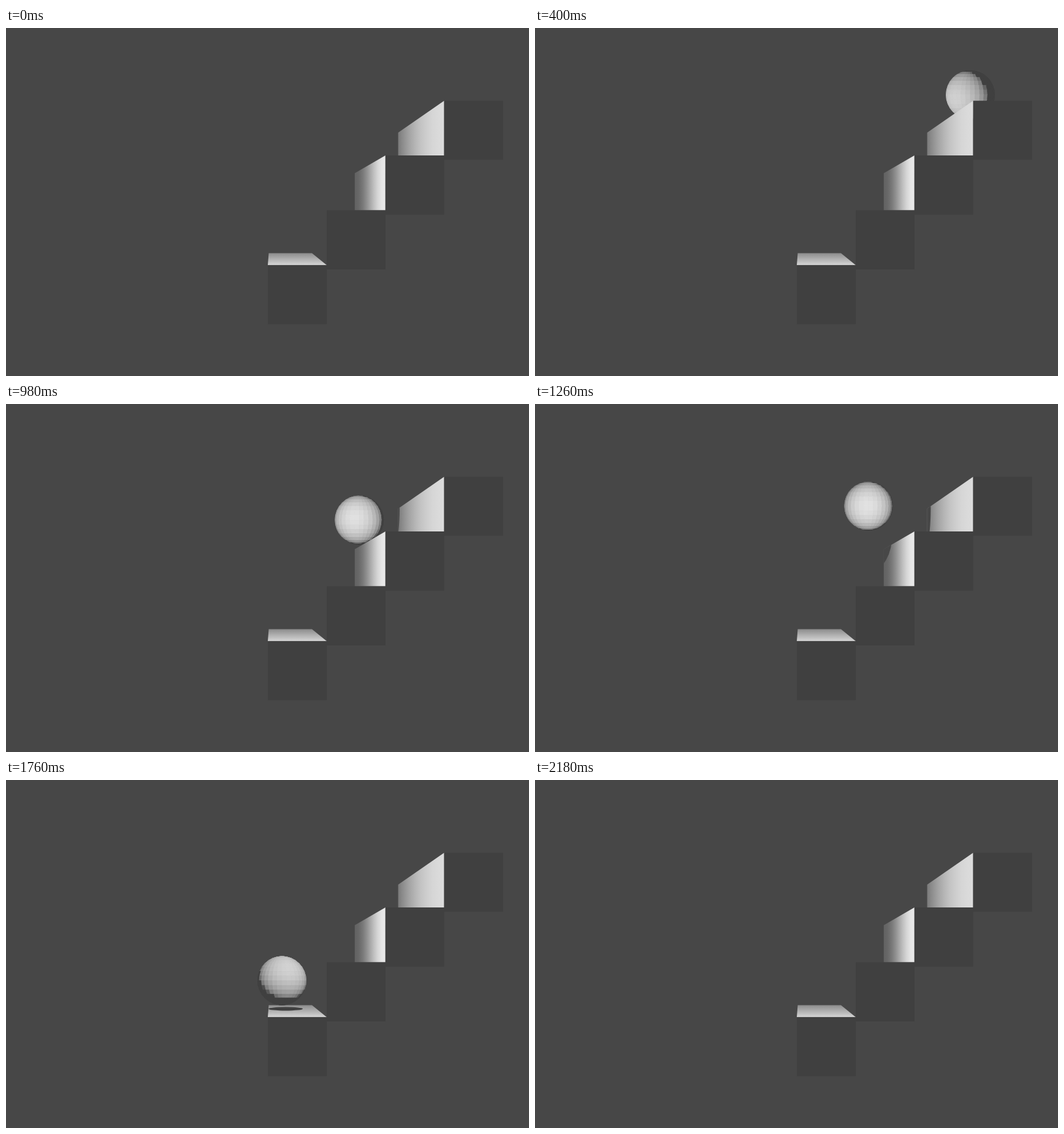
An HTML page with a canvas for the animation above (2200 ms loop, 853 by 568 pixels).

```html
<!DOCTYPE html>
<html>
<head>
<meta charset="utf-8">
<style>
  html, body { margin: 0; width: 100%; height: 100%; overflow: hidden; background: #474747; }
  canvas { display: block; }
</style>
</head>
<body>
<canvas id="stage" width="853" height="568"></canvas>
<script>
const ctx = document.getElementById('stage').getContext('2d');
const LOOP = 2200, STEP = 20, R = 40, RINGS = 16;
const BACK = '#474747', DARK = '#404040';
const LIGHT = [530, 170, 240];

// Falls, bounces and peaks of the ball: [time, x, y].
const path = [
  [0, 711, -47], [400, 710, 109], [600, 645, 96], [1000, 576, 190], [1180, 559, 156],
  [1580, 517, 256.5], [1640, 466, 260], [1800, 449, 340], [2200, 340, 612]
];

const gray = v => `rgb(${v},${v},${v})`;
const mix = (a, b, k) => a + (b - a) * k;
const clamp = k => Math.max(0, Math.min(1, k));
const linear = k => k;
const smooth = k => k * k * (3 - 2 * k);
const easeOut = k => 1 - (1 - k) ** 2;

const stair = i => [714.6 - 95.8 * i, 118.7 + 89.4 * i];

// Lit side of stair i, standing on the next stair.
function wall(i, width, drop, tones, ease) {
  const [x, top] = stair(i), bottom = stair(i + 1)[1], left = x - width;
  return {
    points: [[left, top + drop], [x, top], [x, bottom], [left, bottom]],
    from: [left, 0], to: [x, 0], tones, ease
  };
}

const upperWall = wall(0, 75, 52, [122, 220], easeOut);
const lowerWall = wall(1, 50, 29, [98, 235], smooth);
const topFace = {
  points: [[428.5, 367.5], [499, 367.5], [523, 387], [427, 387]],
  from: [0, 367], to: [0, 387], tones: [138, 213], ease: linear
};

function ballAt(t) {
  const i = path.findIndex(pose => pose[0] > t);
  const [t0, x0, y0] = path[i - 1], [t1, x1, y1] = path[i];
  const k = (t - t0) / (t1 - t0);
  return [mix(x0, x1, easeOut(k)), mix(y0, y1, smooth(k))];
}

function trace(points) {
  ctx.beginPath();
  points.forEach(p => ctx.lineTo(...p));
  ctx.closePath();
}

function oval(x, y, rx, ry, color) {
  ctx.fillStyle = color;
  ctx.beginPath();
  ctx.ellipse(x, y, rx, ry, 0, 0, 2 * Math.PI);
  ctx.fill();
}

// Lit face with an optional shadow [x, y, rx, ry] clipped to it.
function drawFace({ points, from, to, tones, ease }, shadow, color = BACK) {
  const fill = ctx.createLinearGradient(...from, ...to);
  for (let k = 0; k <= 1; k += .125) fill.addColorStop(k, gray(Math.round(mix(...tones, ease(k)))));
  ctx.save();
  trace(points);
  ctx.fillStyle = fill;
  ctx.fill();
  if (shadow) {
    ctx.clip();
    oval(...shadow, color);
  }
  ctx.restore();
}

function normal(ring, seg) {
  const th = ring * Math.PI / RINGS, ph = seg * Math.PI / RINGS;
  return [-Math.sin(th) * Math.cos(ph), -Math.cos(th), Math.sin(th) * Math.sin(ph)];
}

function shade(n, x, y) {
  const d = [x, y, 0].map((c, i) => LIGHT[i] - c - n[i] * R);
  const len = Math.hypot(...d);
  const lit = Math.max(0, n.reduce((sum, c, i) => sum + c * d[i], 0) / len);
  return 64 + 162 * lit ** .4 * (200 / len) ** .4;
}

function drawBall(x, y) {
  ctx.save();
  oval(x, y, R, R, DARK);
  ctx.clip();
  ctx.lineWidth = 1;
  for (let i = 0; i < RINGS; i++) {
    for (let j = 0; j < RINGS; j++) {
      const corners = [[i, j], [i, j + 1], [i + 1, j + 1], [i + 1, j]].map(c => normal(...c));
      trace(corners.map(n => [x + n[0] * R, y + n[1] * R]));
      ctx.fillStyle = ctx.strokeStyle = gray(Math.round(shade(normal(i + .5, j + .5), x, y)));
      ctx.fill();
      ctx.stroke();
    }
  }
  ctx.restore();
}

// A wide shadow from behind that gathers under the landing ball.
function topShadow(t, x) {
  const rise = clamp((t - 1480) / 100), k = clamp((t - 1580) / 180);
  const cx = t < 1760 ? mix(510, 457, k) : x + 6;
  return [cx, 352 + 8 * rise + 13.5 * k, mix(105, 28, k), mix(13, 3, k)];
}

function draw(t) {
  const [x, y] = ballAt(t);
  ctx.fillStyle = BACK;
  ctx.fillRect(0, 0, 853, 568);

  drawFace(topFace, t > 1480 && topShadow(t, x), t < 1660 ? BACK : DARK);
  drawBall(x, y);

  const reach = 656 - 16 * ((t - 1130) / 160) ** 2;
  drawFace(upperWall, reach > 640 && [reach - 30, 170, 30, 110]);
  drawFace(lowerWall, t > 1000 && t < 1620 && [549 - .12 * (y - 165), y + 45, 34, 60]);

  ctx.fillStyle = DARK;
  for (let i = 0; i < 4; i++) ctx.fillRect(...stair(i), 96, 96.5);
}

function frame() {
  draw(Math.floor(performance.now() % LOOP / STEP) * STEP);
  requestAnimationFrame(frame);
}
frame();
</script>
</body>
</html>
```
